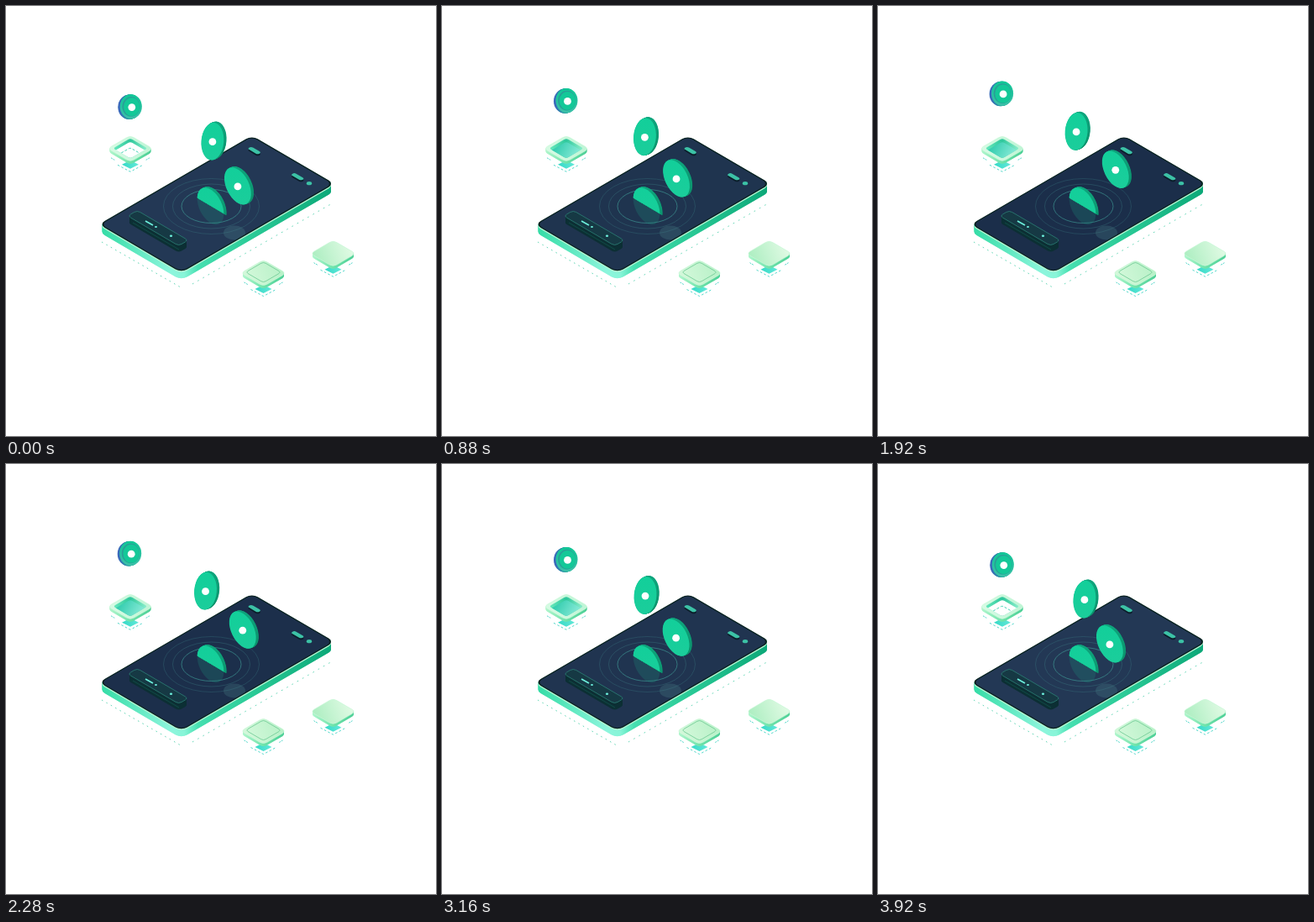
An HTML page with a canvas that plays this animation: 512x512 px, repeating every 4020 ms.

```html
<!DOCTYPE html>
<html lang="en">
<head>
<meta charset="utf-8">
<title>Isometric phone with floating coins</title>
<style>
  html, body { margin: 0; width: 100%; height: 100%; overflow: hidden; background: #fff; }
  canvas { display: block; width: 512px; height: 512px; }
</style>
</head>
<body>
<canvas id="stage" width="512" height="512"></canvas>
<script>
const ctx = document.getElementById('stage').getContext('2d');
const LOOP = 4020, STEP = 40, TRAVEL = 3920;
const TILT = -0.45;

function gradient(x0, y0, x1, y1, ...colors) {
  const g = ctx.createLinearGradient(x0, y0, x1, y1);
  colors.forEach((c, i) => g.addColorStop(i / (colors.length - 1), c));
  return g;
}

// Rounded rectangle on the ground plane; (x, y) is its leftmost sharp corner.
function isoRect(x, y, right, back, radius) {
  const path = new Path2D(), flat = new Path2D();
  flat.roundRect(0, 0, right, back, radius);
  path.addPath(flat, new DOMMatrix([0.866, 0.507, 0.866, -0.503, x, y]));
  return path;
}

function isoSquare(cx, cy, half, radius) {
  const side = half / 0.866;
  return isoRect(cx - half, cy, side, side, radius);
}

function fill(path, style) {
  ctx.fillStyle = style;
  ctx.fill(path);
}

function stroke(path, style, width = 1, dash = []) {
  ctx.strokeStyle = style;
  ctx.lineWidth = width;
  ctx.setLineDash(dash);
  ctx.stroke(path);
  ctx.setLineDash([]);
}

function polyline(...points) {
  const path = new Path2D();
  points.forEach(([x, y]) => path.lineTo(x, y));
  return path;
}

function oval(x, y, rx, ry, turn = 0) {
  const path = new Path2D();
  path.ellipse(x, y, rx, ry, turn, 0, Math.PI * 2);
  return path;
}

function extrude(path, depth, style) {
  ctx.save();
  for (let i = 0; i < depth * 2; i++) {
    ctx.translate(0, 0.5);
    fill(path, style);
  }
  ctx.restore();
}

function pill(x, y, length) {
  fill(isoRect(x, y + 2, length, 5, 2.5), '#0b1e2a');
  fill(isoRect(x, y, length, 5, 2.5), '#3cc2a6');
}

function drawCard() {
  const slab = isoRect(145, 250, 70, 13, 4);
  extrude(slab, 8, '#0c2f34');
  fill(slab, '#163944');
  stroke(slab, '#2c8077', 0.8);
  stroke(polyline([151, 258], [206, 290]), '#12534b', 0.8);
  stroke(polyline([166, 256], [175, 261]), '#6ceedb', 1.8);
  fill(oval(178.5, 263, 1.5, 1.1), '#6ceedb');
  fill(oval(196.5, 273.7, 1.6, 1.2), '#6ceedb');
}

function drawPhone(lift) {
  stroke(polyline([114, 281], [208, 335]), '#35c9a0', 0.8, [1.6, 4.6]);
  stroke(polyline([222, 331], [390, 234]), '#35c9a0', 0.8, [1.6, 5.6]);

  const body = isoRect(110.5, 260, 113.5, 210.5, 8);
  const side = ctx.createLinearGradient(114, 0, 387, 0);
  [[0, '#35dca6'], [0.3, '#8cf5dc'], [0.36, '#88f5d8'], [0.42, '#46dfb0'],
   [0.65, '#2bcb97'], [1, '#0ca878']].forEach(s => side.addColorStop(...s));
  extrude(body, 9, side);
  extrude(body, 1.5, '#b4f7d4');
  fill(body, '#09201f');

  const screen = isoRect(113, 260, 110.5, 207.5, 7);
  fill(screen, '#233855');
  ctx.save();
  ctx.globalAlpha = 0.7 * lift;
  fill(screen, '#182a45');
  ctx.restore();

  ctx.save();
  ctx.clip(screen);
  stroke(oval(244.5, 238.5, 57, 33), 'rgba(70, 150, 150, 0.3)', 0.8);
  stroke(oval(244.5, 238.5, 46, 26.5), 'rgba(70, 150, 150, 0.35)', 0.8);
  stroke(oval(244.5, 238.5, 35.5, 20), 'rgba(70, 175, 165, 0.6)', 0.9);
  fill(oval(272, 270, 13, 8.5), 'rgba(80, 140, 145, 0.25)');
  ctx.restore();

  drawCard();
  pill(287.5, 169.8, 14);
  pill(339, 200.9, 14);
  fill(oval(361, 211.2, 3.2, 2.1), '#3cc2a6');
}

function drawCoin(x, y, rx, ry, turn, marked = true) {
  const edge = gradient(x, y - ry, x, y + ry, '#0ea57d', '#0a9069');
  for (let i = 8; i > 0; i--) {
    fill(oval(x + i * 0.4, y - i * 0.16, rx, ry, turn), edge);
  }
  fill(oval(x, y, rx, ry, turn), gradient(x, y - ry, x, y + ry, '#12cf9a', '#1bcd9b'));
  if (marked) fill(oval(x, y + 0.5, 4.4, 4.4), '#fff');
}

function drawSunkenCoin() {
  const x = 243.5, y = 238.3;
  fill(oval(x, y, 13.5, 23.5, TILT), 'rgba(30, 145, 125, 0.25)');
  ctx.save();
  ctx.clip(polyline([220, 224], [226, 227.5], [264, 250], [270, 210], [220, 210]));
  drawCoin(x, y, 13.5, 23.5, TILT, false);
  ctx.restore();
}

function drawRimmedCoin(x, y) {
  const rim = gradient(x - 14, y, x + 13, y, '#3a68bb', '#22a39a', '#14b98d');
  for (let i = 5; i > 0; i--) fill(oval(x - i * 0.5, y + i * 0.12, 13, 14.6), rim);
  fill(oval(x, y, 13, 14.6), gradient(x, y - 14, x, y + 14, '#10c896', '#3cc0a8'));
  fill(oval(x + 0.3, y, 10.7, 11.8), '#2a9e97');
  fill(oval(x + 1, y + 0.3, 9.8, 10.9), '#14c898');
  fill(oval(x + 1, y + 0.8, 4.4, 4.4), '#fff');
}

function drawStand(x, y) {
  fill(polyline([x, y + 14], [x + 10, y + 19], [x, y + 24], [x - 10, y + 19]),
    gradient(x - 10, 0, x + 10, 0, '#36d9c6', '#62e8d8'));
  stroke(polyline([x - 15, y + 19.5], [x, y + 27.5], [x + 15, y + 19.5]), '#3fd3c3', 0.9, [2.6, 2.4]);
  stroke(polyline([x - 23, y + 11], [x - 18, y + 14]), '#3fd3c3', 0.9, [2, 1]);
  stroke(polyline([x + 23, y + 11], [x + 18, y + 14]), '#3fd3c3', 0.9, [2, 1]);
}

function drawPlate(x, y, from, to) {
  const plate = isoSquare(x, y, 27, 5);
  drawStand(x, y);
  extrude(plate, 3.5, gradient(x - 24, 0, x + 24, 0, '#aef5cb', '#6fe3ab', '#4fd097'));
  fill(plate, gradient(x - 20, y + 8, x + 20, y - 8, from, to));
  stroke(plate, '#cbf8d9', 0.7);
}

function drawSocket(x, y, lit) {
  drawPlate(x, y, '#d6fbe4', '#bff5d6');
  const hole = isoSquare(x, y - 0.3, 20.5, 3);
  fill(hole, gradient(x - 18, 0, x + 18, 0, '#62e6ba', '#2fc79b', '#86ecc9'));
  ctx.save();
  ctx.clip(hole);
  ctx.translate(0, 4);
  fill(hole, lit ? gradient(x - 14, y - 8, x + 12, y + 8, '#2fcbad', '#8aebd8') : '#fff');
  if (!lit) stroke(isoSquare(x, y + 2.5, 13, 2), '#43d3b4', 1, [3, 2]);
  ctx.restore();
}

function draw(time) {
  const t = Math.min(TRAVEL, Math.floor((time % LOOP) / STEP) * STEP);
  const lift = 1 - Math.abs(1 - 2 * t / TRAVEL);

  ctx.fillStyle = '#fff';
  ctx.fillRect(0, 0, 512, 512);

  drawPhone(lift);
  drawSunkenCoin();
  drawSocket(148, 169.8, lift > 0.33);
  drawPlate(306.5, 318, '#d3f8da', '#b9f1c8');
  stroke(isoSquare(306.5, 317, 21, 3), '#6cc994', 0.8);
  drawPlate(389.5, 294.7, '#aeeec2', '#dffae3');

  drawRimmedCoin(148.8 - 0.7 * lift, 119.8 - 16 * lift);
  drawCoin(245.9 - 10 * lift, 161.2 - 12 * lift, 13.4, 22.4, 0.08);
  drawCoin(275.9 + 7 * lift, 214.4 - 20 * lift, 13.5, 23.7, TILT);
}

const start = performance.now();
function tick() {
  draw(performance.now() - start);
  requestAnimationFrame(tick);
}
tick();
</script>
</body>
</html>
```
